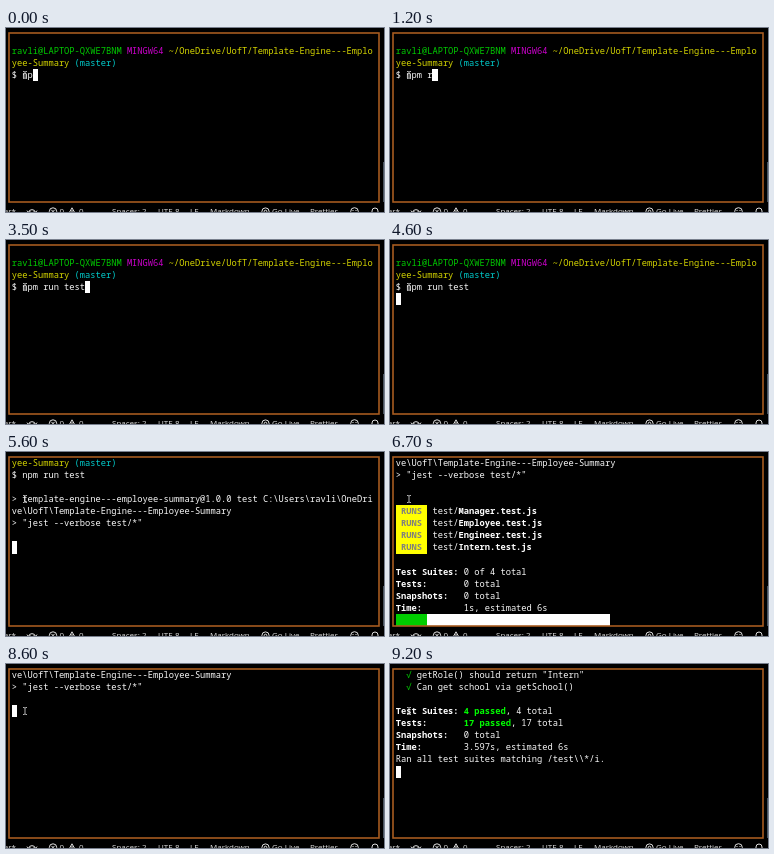
These frames come from a looping animation (378 px wide and 184 px high, 9.3 s). An HTML page:

```html
<!DOCTYPE html>
<html lang="en">
<head>
<meta charset="utf-8">
<title>Terminal test run</title>
<style>
  html, body { margin: 0; width: 100%; height: 100%; overflow: hidden; background: #000; }
  #stage { position: relative; width: 378px; height: 184px; overflow: hidden; background: #000; }
  #screen {
    position: absolute; left: 5.8px; top: 4.5px; margin: 0; color: #fafafa;
    font: 8.73px/12.15px "Noto Sans Mono", "DejaVu Sans Mono", monospace;
    font-variant-ligatures: none;
  }
  #screen div { height: 12.15px; white-space: pre; }
  #screen span { display: inline-block; height: 12.15px; vertical-align: top; }
  .green { color: #00cd00; }
  .magenta { color: #cd00cd; }
  .yellow { color: #d6d600; }
  .cyan { color: #00cdcd; }
  .bold { color: #fff; font-weight: bold; }
  .ok { color: #0f0; font-weight: bold; }
  .runs, .pass { color: #7f7f7f; font-weight: bold; }
  .runs { background: #ff0; }
  .pass { background: #0f0; }
  .fill { background: #00cd00; }
  .block { background: #fff; }
  svg { position: absolute; left: 0; top: 0; }
  svg text { font: 8px "Open Sans", "Noto Sans", sans-serif; fill: #e0e0e0; }
</style>
</head>
<body>
<div id="stage">
  <div id="screen"></div>
  <svg width="378" height="184" fill="none" stroke="#e0e0e0" stroke-width="1">
    <rect x="3" y="5" width="370" height="169" stroke="#a85c20" stroke-width="1.6"/>
    <path d="M377.5 134V174" stroke="#4a5560"/>
    <path d="M17 43.5h1.2l.8 .6l.8 -.6h1.2M19 44v6M17 50.5h1.2l.8 -.6l.8 .6h1.2" stroke="#ddd" stroke-width=".8"/>
    <path d="M22.4 184.5a3.7 3.7 0 0 1 7.2 0M21 182.6l1.4 1.9l2 -1M27.6 183.5l2 1l1.4 -1.9"/>
    <circle cx="47" cy="183.5" r="3.7"/>
    <path d="M45.3 181.8l3.4 3.4M48.7 181.8l-3.4 3.4"/>
    <path d="M62 187L66 179.8L70 187M66 182v3"/>
    <circle cx="259.5" cy="183.5" r="3.6"/>
    <circle cx="259.5" cy="183.5" r="1.3"/>
    <circle cx="348.5" cy="183.5" r="3.8"/>
    <path d="M347 182v1M350 182v1"/>
    <path d="M366 187v-4a3 3 0 0 1 6 0v4"/>
    <g stroke="none">
      <text x="10" y="186" text-anchor="end">master*</text>
      <text x="53.5" y="186">0</text>
      <text x="73" y="186">0</text>
      <text x="106" y="186">Spaces: 2</text>
      <text x="152" y="186">UTF-8</text>
      <text x="184" y="186">LF</text>
      <text x="204" y="186">Markdown</text>
      <text x="266" y="186">Go Live</text>
      <text x="304" y="186">Prettier</text>
    </g>
  </svg>
</div>
<script>
const LOOP = 9300, ROWS = 14, BAR = 40, ESTIMATE = 6;
const paint = (name, text) => `<span class="${name}">${text}</span>`;
const blocks = (name, n) => n ? paint(name, ' '.repeat(n)) : '';
const cursor = blocks('block', 1);

const prompt = [
  paint('green', 'ravli@LAPTOP-QXWE7BNM') + ' ' + paint('magenta', 'MINGW64') + ' ' +
    paint('yellow', '~/OneDrive/UofT/Template-Engine---Emplo'),
  paint('yellow', 'yee-Summary') + ' ' + paint('cyan', '(master)')
];
const command = 'npm run test';
const npmLog = [
  prompt[1], '$ ' + command, '',
  '> template-engine---employee-summary@1.0.0 test C:\\Users\\ravli\\OneDri',
  've\\UofT\\Template-Engine---Employee-Summary',
  '> "jest --verbose test/*"', ''
];
const jestTop = npmLog.slice(4);
const waiting = [...jestTop, cursor];

const suites = [
  ['Manager', 'Can set office number via constructor argument',
    'getRole() should return "Manager"', 'Can get office number via getOffice()'],
  ['Employee', 'Can instantiate Employee instance',
    'Can set name via constructor arguments', 'Can set id via constructor argument',
    'Can set email via constructor argument', 'Can get name via getName()',
    'Can get id via getId()', 'Can get email via getEmail()',
    'getRole() should return "Employee"'],
  ['Engineer', 'Can set GitHub account via constructor',
    'getRole() should return "Engineer"', 'Can get GitHub username via getGithub()'],
  ['Intern', 'Can set school via constructor',
    'getRole() should return "Intern"', 'Can get school via getSchool()']
];
const badge = (kind, [name]) =>
  `${paint(kind, ` ${kind.toUpperCase()} `)} test/${paint('bold', name + '.test.js')}`;
const check = test => `  ${paint('green', '√')} ${test}`;
const report = suite => [badge('pass', suite), ...suite.slice(1).map(check), ''];

function summary(done, time) {
  const tests = suites.slice(0, done).reduce((n, s) => n + s.length - 1, 0);
  const passed = n => n ? paint('ok', n + ' passed') + ', ' : '';
  const label = text => paint('bold', text.padEnd(13));
  return [
    '',
    label('Test Suites:') + passed(done) + (done < 4 ? `${done} of 4 total` : '4 total'),
    label('Tests:') + passed(tests) + tests + ' total',
    label('Snapshots:') + '0 total',
    label('Time:') + `${time}s, estimated ${ESTIMATE}s`
  ];
}

function bar(seconds) {
  const n = Math.floor(seconds / ESTIMATE * BAR);
  return blocks('fill', n) + blocks('block', BAR - n) + cursor;
}

// Jest's live view: finished reports, running suites, totals and progress.
function running(seconds, done = 0, started = 4) {
  return [
    ...npmLog,
    ...suites.slice(0, done).flatMap(report),
    '',
    ...suites.slice(done, started).map(s => badge('runs', s)),
    ...summary(done, seconds),
    bar(seconds)
  ].slice(-ROWS);
}

const typed = n => ['', ...prompt, '$ ' + command.slice(0, n) + cursor];

const steps = [
  ...[0, 300, 600, 900, 1600, 2100, 2300, 2700, 2900, 3200, 3400].map((t, i) => [t, typed(i + 2)]),
  [3800, ['', ...prompt, '$ ' + command, cursor]],
  [5100, [...npmLog, cursor]],
  [5700, running(0, 0, 1)],
  [5800, running(0, 0, 3)],
  [5900, running(0)],
  [6600, waiting],
  [6700, running(1)],
  [7600, waiting],
  [7700, running(2)],
  [8600, waiting],
  [8700, running(3, 1)],
  [8900, running(3, 2)],
  [9000, running(3, 3)],
  [9100, running(3, 4)],
  [9200, [
    ...suites[3].slice(2).map(check), ...summary(4, '3.597'),
    'Ran all test suites matching /test\\\\*/i.', cursor
  ]]
];

const screen = document.getElementById('screen');
const start = performance.now();
let shown = null;

function draw() {
  const t = (performance.now() - start) % LOOP;
  const step = steps.filter(([at]) => at <= t).pop();
  if (step !== shown) {
    screen.innerHTML = step[1].map(line => `<div>${line}</div>`).join('');
    shown = step;
  }
  requestAnimationFrame(draw);
}
draw();
</script>
</body>
</html>
```
